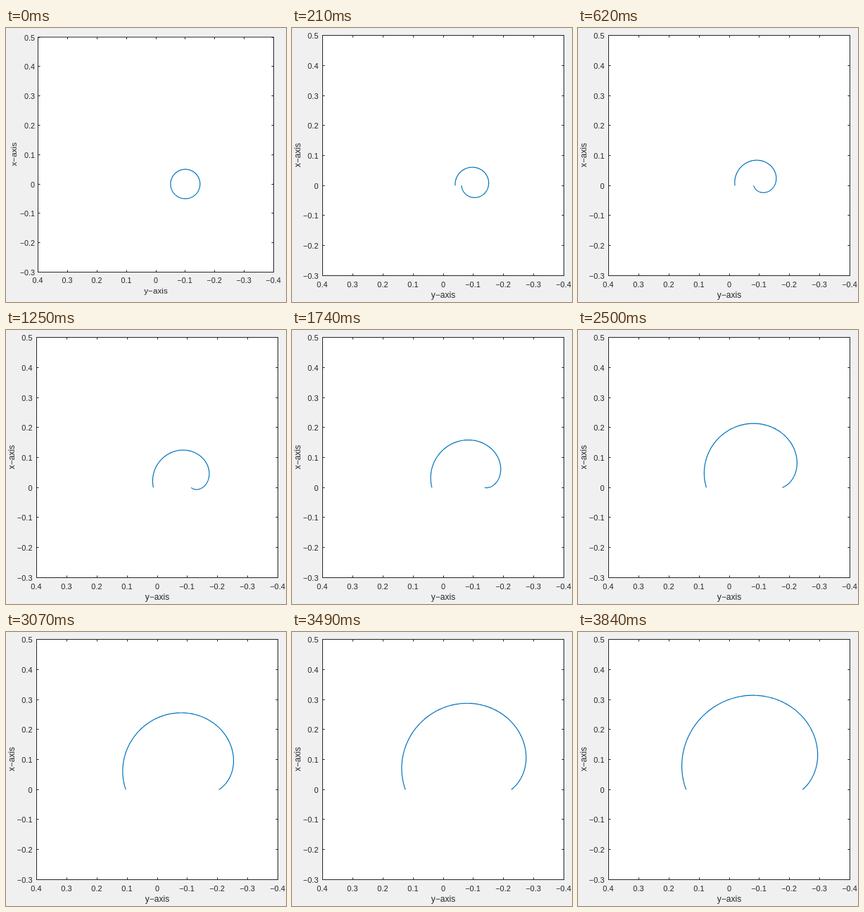
Write an HTML page that moves like this. It is 398 px wide and 390 px high and loops after 4700 ms.

```html
<!DOCTYPE html>
<html lang="en">
<head>
<meta charset="utf-8">
<title>Expanding curve</title>
<style>
  html, body { margin: 0; width: 100%; height: 100%; overflow: hidden; background: #f0f0f0; }
  svg { display: block; width: 398px; height: 390px; }
  text { font-family: "Liberation Sans", Arial, sans-serif; fill: #262626; }
</style>
</head>
<body>
<svg id="stage" viewBox="0 0 398 390" xmlns="http://www.w3.org/2000/svg">
  <rect width="398" height="390" fill="#f0f0f0"/>
  <g id="first"></g>
  <g id="rest"></g>
  <path id="curve" fill="none" stroke="#0072bd" stroke-width="1.2" stroke-linejoin="round"/>
</svg>
<script>
const LOOP = 4700, LAST = 55;
const SPEED = 0.0000503;   // axis units per ms at the end points
const BULGE = 0.565;       // extra speed in the middle of the curve
const RADIUS = 0.05, CENTER = -0.1;

// The opening picture has slightly tighter axes than the following ones.
const small = { left: 45.5, right: 380.5, top: 13, bottom: 347.5, size: 10.8, nameSize: 11.7,
                numX: 41, numY: 363, nameX: 15, nameY: 378 };
const large = { left: 43.5, right: 386.5, top: 10.5, bottom: 352.5, size: 11, nameSize: 12,
                numX: 37.5, numY: 369, nameX: 12, nameY: 384 };

const byId = id => document.getElementById(id);
const px = (a, y) => a.left + (0.4 - y) / 0.8 * (a.right - a.left);
const py = (a, x) => a.top + (0.5 - x) / 0.8 * (a.bottom - a.top);
const label = n => (n < 0 ? "\u2212" : "") + (n ? "0." + Math.abs(n) : "0");

function axes(a) {
  const { left, right, top, bottom } = a;
  let ticks = "", texts = "";
  const text = (x, y, size, anchor, s, extra = "") => {
    texts += `<text x="${x}" y="${y}" text-anchor="${anchor}" font-size="${size}" ${extra}>${s}</text>`;
  };
  for (let i = 0; i <= 8; i++) {
    const x = Math.floor(px(a, (4 - i) / 10)) + 0.5;
    const y = Math.floor(py(a, (5 - i) / 10)) + 0.5;
    ticks += `M${x} ${top}v3M${x} ${bottom}v-3M${left} ${y}h3M${right} ${y}h-3`;
    text(x - 0.5, a.numY, a.size, "middle", label(4 - i));
    text(a.numX, y + 4.5, a.size, "end", label(5 - i));
  }
  const midY = (top + bottom) / 2 - 0.5;
  text((left + right) / 2, a.nameY, a.nameSize, "middle", "y\u2212axis");
  text(a.nameX, midY, a.nameSize, "middle", "x\u2212axis", `transform="rotate(-90 ${a.nameX} ${midY})"`);
  return `<rect x="${left}" y="${top}" width="${right - left}" height="${bottom - top}" fill="#fff" stroke="#262626"/>` +
         `<path d="${ticks}" stroke="#262626" fill="none"/>` + texts;
}

// Each point of a circle flies off along half its own angle.
function curve(a, d) {
  const pts = [];
  for (let i = 0; i <= 180; i++) {
    const h = Math.PI * i / 180;
    const go = d * (1 + BULGE * Math.sin(h));
    const y = CENTER + RADIUS * Math.cos(2 * h) + go * Math.cos(h);
    const x = RADIUS * Math.sin(2 * h) + go * Math.sin(h);
    pts.push(px(a, y).toFixed(2) + " " + py(a, x).toFixed(2));
  }
  return "M" + pts.join("L");
}

// Steps last 70 ms, apart from a few uneven ones.
const uneven = { 4: 60, 27: 80, 34: 50, 42: 80 };
const starts = [0];
for (let i = 0; i < LAST; i++) starts.push(starts[i] + (uneven[i] || 70));

byId("first").innerHTML = axes(small);
byId("rest").innerHTML = axes(large);

let shown = -1;
function draw(t) {
  let k = LAST;
  while (starts[k] > t) k--;
  if (k === shown) return;
  shown = k;
  byId("first").style.display = k ? "none" : "";
  byId("rest").style.display = k ? "" : "none";
  byId("curve").setAttribute("d", curve(k ? large : small, starts[k] * SPEED));
}

const begin = performance.now();
function tick() {
  draw((performance.now() - begin) % LOOP);
  requestAnimationFrame(tick);
}
draw(0);
requestAnimationFrame(tick);
</script>
</body>
</html>
```
